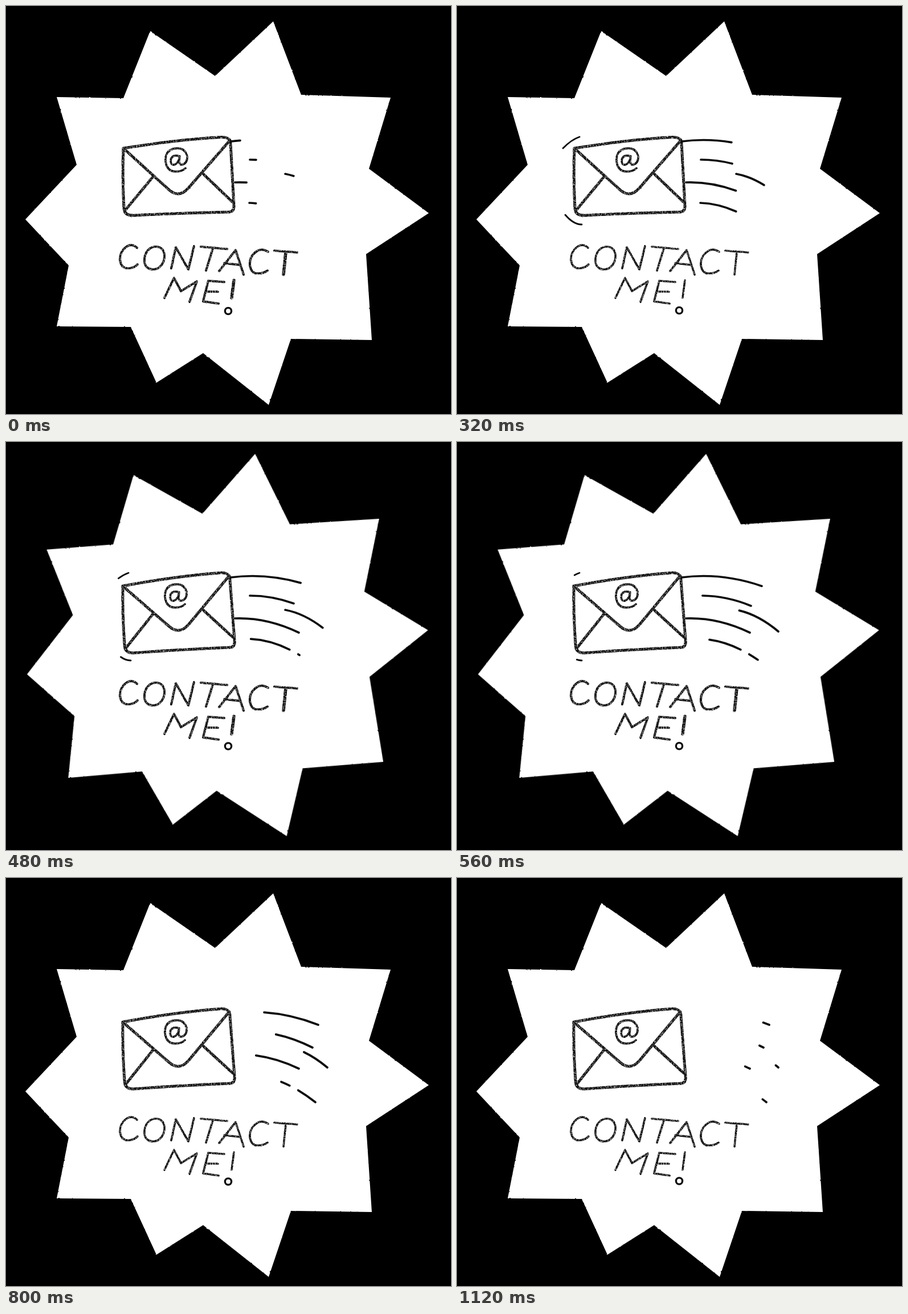
Write an HTML page that moves like this. It is 781 px wide and 717 px high and loops after 1200 ms.

```html
<!DOCTYPE html>
<html lang="en">
<head>
<meta charset="utf-8">
<title>Contact me</title>
<style>
  html, body { margin: 0; height: 100%; overflow: hidden; background: #000; }
  svg { display: block; width: 100vw; height: 100vh; }
  .ink { fill: none; stroke: #0c0c0c; stroke-linecap: round; stroke-linejoin: round; }
</style>
</head>
<body>
<svg viewBox="0 0 781 717" role="img" aria-label="Contact me!">
  <defs>
    <filter id="rough" filterUnits="userSpaceOnUse" x="0" y="0" width="781" height="717" color-interpolation-filters="sRGB">
      <feTurbulence type="fractalNoise" baseFrequency=".2" numOctaves="2" seed="4"/>
      <feDisplacementMap in="SourceGraphic" scale="2" xChannelSelector="R" yChannelSelector="G"/>
    </filter>
    <filter id="pencil" filterUnits="userSpaceOnUse" x="180" y="210" width="350" height="350" color-interpolation-filters="sRGB">
      <feTurbulence type="fractalNoise" baseFrequency=".45" numOctaves="2" seed="9" result="noise"/>
      <feDisplacementMap in="SourceGraphic" in2="noise" scale="1.6" xChannelSelector="R" yChannelSelector="G" result="line"/>
      <feColorMatrix in="noise" values="0 0 0 0 0  0 0 0 0 0  0 0 0 0 0  0 0 0 2 -.12" result="grain"/>
      <feComposite in="line" in2="grain" operator="in"/>
      <feGaussianBlur stdDeviation=".5"/>
    </filter>
  </defs>
  <g id="star">
    <path fill="#fff" filter="url(#rough)" d="M253 44L367 123 469 27 518 156 675 161 637 286 742 364 632 436 642 587 500 585 461 701 346 610 264 662 219 564 89 563 110 456 34 375 124 279 89 160 206 162Z"/>
  </g>
  <g class="ink" filter="url(#pencil)">
    <path id="envelope" stroke-width="5" d="M206 250Q300 235 370 231Q393 228 394 240L400 350Q401 361 392 362Q300 364 225 368Q208 369 207 356Q204 300 206 250M207 251L285 322Q303 339 320 320L393 236M258 300L210 358M346 295L397 344"/>
    <path id="at" stroke-width="3.8" d="M305 264Q290 260 289 272Q289 280 296 279Q303 276 305 264Q302 280 309 279Q319 276 318 264Q314 249 299 250Q279 252 280 272Q282 292 300 291Q310 290 315 285"/>
    <g id="words">
      <path d="M230 425Q222 417 213 422Q200 430 200 446Q202 462 216 461Q226 460 231 454
        M263 423C249 423 242 437 243 449C244 460 252 463 259 463C272 462 279 449 278 437C277 428 271 423 263 423
        M290 461L298 424L320 463L330 422 M342 423L388 427M363 426L351 465
        M374 466L403 429L417 472M383 452L411 455
        M460 432Q449 425 440 431Q427 440 428 455Q430 471 443 470Q452 470 459 465 M471 430L511 433
        M278 513L295 478L307 501L335 484L322 520
        M383 485L355 483L346 519L373 523M351 502L372 502"/>
      <path id="accent" d="M491 433L487 472M400 482L396 513"/>
    </g>
  </g>
  <g class="ink">
    <circle id="dot" r="5.6" stroke-width="3.4"/>
    <path id="streaks" stroke-width="3.7"/>
    <path id="ticks" stroke-width="2.8"/>
  </g>
</svg>
<script>
const STEP = 80, STEPS = 15;
const lettering = "01201212"; // hand-drawn variant, each held for two steps

// Curves run from left to right with the control point halfway;
// head: drawn share at the start, speed: growth per step, fade: step where the tail lets go
const streaks = [
  { curve: [394, 238, 228, 548, 258], head: .11, speed: .115, fade: 7.2 },
  { curve: [428, 270, 270, 538, 298], head: .1, speed: .1, fade: 6.8 },
  { curve: [490, 295, 302, 564, 333], head: .2, speed: .115, fade: 6.4 },
  { curve: [402, 310, 308, 514, 335], head: .18, speed: .15, fade: 7.8 },
  { curve: [427, 346, 348, 543, 394], head: .1, speed: .11, fade: 5.8, gap: [.61, .74] }
];
const ticks = [[186, 250, 235, 215, 230], [190, 367, 384, 219, 384]];

const $ = id => document.getElementById(id);
const set = (id, attrs) => Object.entries(attrs).forEach(([k, v]) => $(id).setAttribute(k, v));
const clamp = x => Math.min(1, Math.max(0, x));

// The part of a quadratic curve between parameters a and b
function trim([x0, y0, cy, x1, y1], a, b) {
  if (b <= a) return "";
  const x = t => x0 + (x1 - x0) * t;
  const y = (s, t) => (1 - s) * (1 - t) * y0 + (s + t - 2 * s * t) * cy + s * t * y1;
  return `M${x(a)} ${y(a, a)}Q${x((a + b) / 2)} ${y(a, b)} ${x(b)} ${y(b, b)}`;
}

function streakPath({ curve, head, speed, fade, gap = [1, 1] }, n) {
  const from = clamp((n - fade) / (14.5 - fade)), to = clamp(head + speed * n);
  return trim(curve, from, Math.min(to, gap[0])) + trim(curve, Math.max(from, gap[1]), to);
}

function draw(n) {
  const pair = n >> 1, odd = pair % 2, look = +lettering[pair];
  const turned = Math.floor(n / 5) % 2;
  set("star", { transform: `rotate(${-5.4 * turned} 388 361)` });
  set("envelope", { transform: `translate(0 ${odd}) rotate(${-1.2 * odd} 303 297)` });
  set("at", { transform: `translate(${-odd} 0)` });
  set("words", { "stroke-width": [4.1, 4.3, 3.7][look], transform: `translate(${look % 2} 0)` });
  set("accent", { "stroke-width": [5.6, 4.3, 3.6][look] });
  set("dot", { cx: 390 - look % 2, cy: 536 - n / 4 });
  set("streaks", { d: streaks.map(s => streakPath(s, n)).join("") });
  const from = clamp((n - 4.7) / 3.3), to = clamp((n - .9) / 3);
  set("ticks", { d: ticks.map(c => trim(c, from, to)).join("") });
}

const start = performance.now();
let shown = -1;
function loop() {
  const n = Math.floor((performance.now() - start) / STEP) % STEPS;
  if (n !== shown) draw(shown = n);
  requestAnimationFrame(loop);
}
loop();
</script>
</body>
</html>
```
